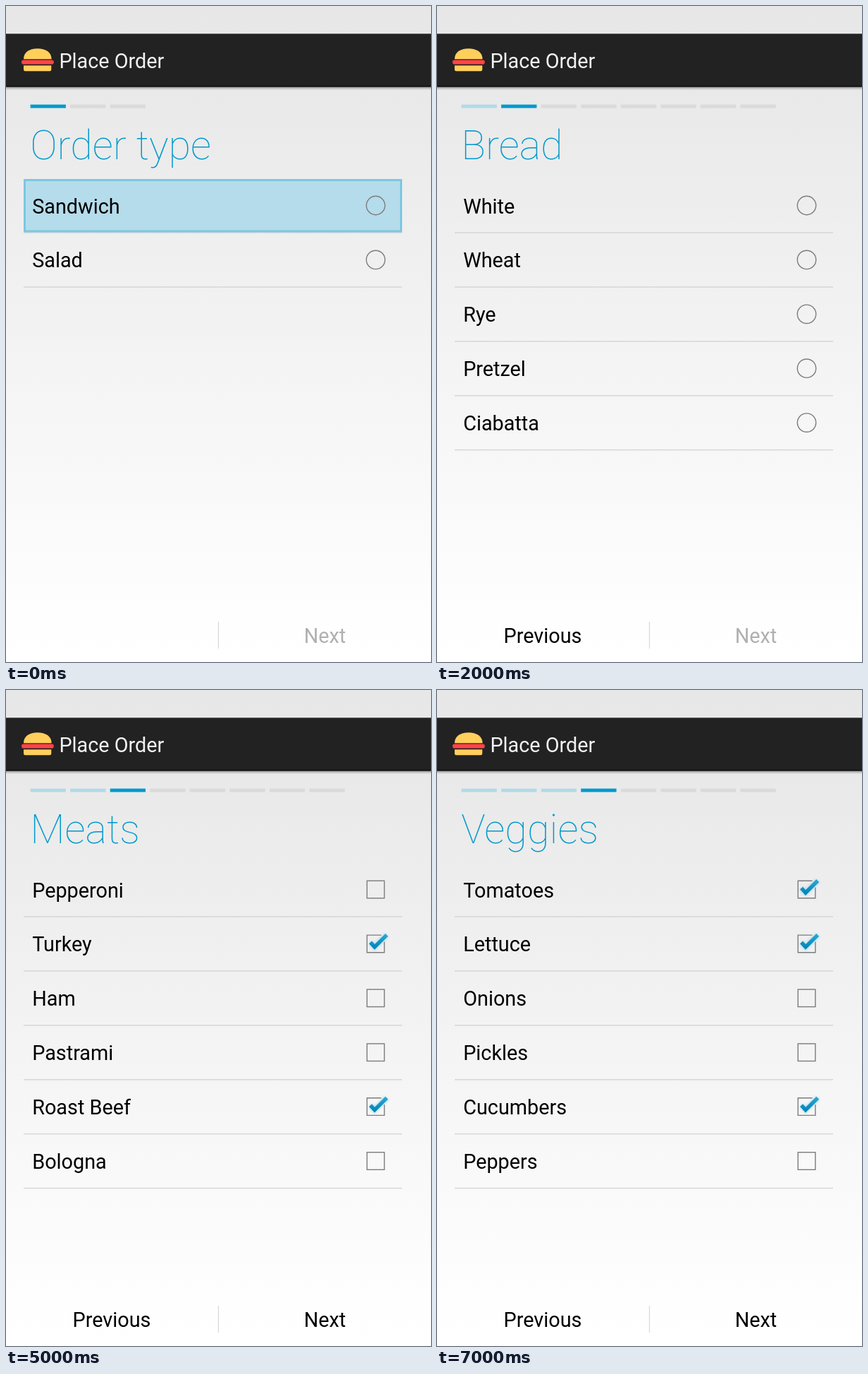
An HTML page that plays this animation: 603x929 px, repeating every 8000 ms.

```html
<!DOCTYPE html>
<html lang="en">
<head>
<meta charset="utf-8">
<title>Place Order</title>
<style>
  html, body { margin: 0; width: 100%; height: 100%; overflow: hidden; background: #fff; }
  svg { display: block; width: 603px; height: 929px; }
  text { font: 28.8px Roboto, sans-serif; fill: #000; }
  .bar { fill: #f3f3f3; }
  .title { font-size: 57.6px; font-weight: 100; fill: #0099cc; }
  .mid { text-anchor: middle; }
  .off { fill: #b0b0b0; }
  .box { fill: none; stroke: #7c7c7c; stroke-width: 1.4; }
  .rule { fill: #d6d6d6; }
</style>
</head>
<body>
<svg viewBox="0 0 603 929">
  <defs>
    <linearGradient id="bg" x2="0" y2="1">
      <stop offset="0" stop-color="#e7e7e7"/>
      <stop offset=".13" stop-color="#e9e9e9"/>
      <stop offset=".93" stop-color="#fefefe"/>
      <stop offset="1" stop-color="#fff"/>
    </linearGradient>
    <linearGradient id="shade" x2="0" y2="1">
      <stop offset="0" stop-color="#000" stop-opacity=".38"/>
      <stop offset="1" stop-color="#000" stop-opacity="0"/>
    </linearGradient>
    <linearGradient id="ink" x2="0" y2="1">
      <stop offset="0" stop-color="#2aa5d3"/>
      <stop offset="1" stop-color="#0587bb"/>
    </linearGradient>
    <filter id="glow" x="-50%" y="-50%" width="200%" height="200%">
      <feGaussianBlur stdDeviation="1.8"/>
    </filter>
  </defs>
  <rect width="603" height="929" fill="url(#bg)"/>
  <rect y="114" width="603" height="5" fill="url(#shade)"/>
  <rect y="39.3" width="603" height="75.2" fill="#222"/>
  <rect y="112.6" width="603" height="1.9" fill="#141414"/>
  <path d="M25 75.2C25 65.500 33 60.300 44.700 60.300S64.600 65.500 64.600 75.200Z" fill="#ffcf5c"/>
  <rect x="22" y="76.600" width="45.800" height="6" rx="2.800" fill="#ff4444"/>
  <path d="M25 84.300H64.300V90Q64.300 92.300 62 92.300H27.300Q25 92.300 25 90Z" fill="#ffcf5c"/>
  <text class="bar" x="75.400" y="87.700">Place Order</text>
  <rect x="300.800" y="872" width="1.300" height="38" fill="#d9d9d9"/>
  <g id="screens"></g>
</svg>
<script>
const STEP_MS = 1000, ROW = 76.9;

const order = { title: 'Order type', page: 0, radio: true, rows: ['Sandwich', 'Salad'] };
const bread = { title: 'Bread', page: 1, radio: true, rows: ['White', 'Wheat', 'Rye', 'Pretzel', 'Ciabatta'] };
const meats = { title: 'Meats', page: 2, rows: ['Pepperoni', 'Turkey', 'Ham', 'Pastrami', 'Roast Beef', 'Bologna'] };
const veggies = { title: 'Veggies', page: 3, rows: ['Tomatoes', 'Lettuce', 'Onions', 'Pickles', 'Cucumbers', 'Peppers'] };

// dx: how far the page still is from its resting place
const steps = [
  { ...order, pages: 3, pressed: 0, locked: true },
  { ...order, on: [0] },
  { ...bread, locked: true },
  { ...bread, on: [1] },
  { ...meats, dx: 4 },
  { ...meats, on: [1, 4] },
  { ...veggies, dx: 10 },
  { ...veggies, on: [0, 1, 4] }
];

const label = (s, x, y, cls = '') => `<text class="${cls}" x="${x}" y="${y}">${s}</text>`;

function radio(on) {
  const dot = on ? '<circle r="9" fill="#8fb9c9"/><circle r="7.9" fill="#0099cc"/>' : '';
  return `<circle class="box" r="13.200"${on ? ' style="fill:#d3dfe4"' : ''}/>${dot}`;
}

function check(on) {
  if (!on) return '<rect class="box" x="-12.300" y="-12.300" width="24.600" height="24.600"/>';
  const tick = 'M-7.500 -2L-1.500 4.500L15.700 -12.500';
  return `<path class="box" d="M8 -12.300H-12.300V12.300H12.300V-3"/>
    <path d="${tick}" fill="none" stroke="#8fd3ec" stroke-width="8" opacity=".6" filter="url(#glow)"/>
    <path d="${tick}" fill="none" stroke="url(#ink)" stroke-width="5.400"/>`;
}

function progress(page, count) {
  const color = i => i < page ? '#b3d9e8' : i > page ? '#dadada' : '#0099cc';
  return Array.from({ length: count }, (_, i) =>
    `<rect x="${34.6 + i * 56.55}" y="139.600" width="50.300" height="4.900" fill="${color(i)}"/>`).join('');
}

function screen({ title, page, rows, radio: single, on = [], pages = 8, pressed, locked, dx = 0 }) {
  const list = rows.map((name, i) => {
    const mark = single ? radio : check;
    const press = i === pressed
      ? '<rect x="26.500" y="246.500" width="534" height="72.500" fill="#b5dceb" stroke="#7cc7e2" stroke-width="3"/>' : '';
    return `<g transform="translate(0 ${i * ROW})">
      <rect class="rule" x="25" y="320.300" width="537" height="1.500"/>${press}
      ${label(name, 37.2, 293.5)}
      <g transform="translate(524.500 282.500)">${mark(on.includes(i))}</g></g>`;
  }).join('');
  return `<g visibility="hidden">${progress(page, pages)}
    <g transform="translate(${dx} 0)">${label(title, 34.2, 216.8, 'title')}${list}</g>
    ${page ? label('Previous', 150, 902.3, 'mid') : ''}
    ${label('Next', 452.5, 902.3, locked ? 'mid off' : 'mid')}</g>`;
}

const host = document.getElementById('screens');
host.innerHTML = steps.map(screen).join('');

function draw() {
  const now = Math.floor(performance.now() / STEP_MS) % steps.length;
  [...host.children].forEach((g, i) => g.setAttribute('visibility', i === now ? 'visible' : 'hidden'));
  requestAnimationFrame(draw);
}
draw();
</script>
</body>
</html>
```
